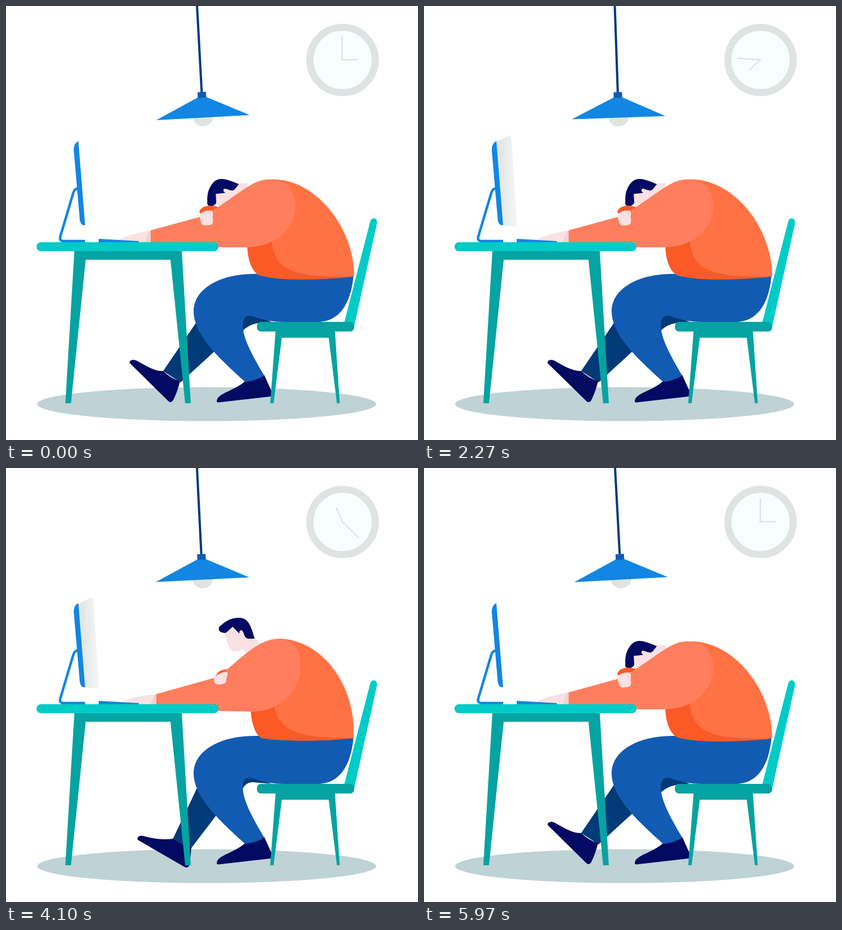
An HTML page that plays this animation: 729 px wide and 768 px high, repeating every 6010 ms.

```html
<!DOCTYPE html>
<html lang="en">
<head>
<meta charset="utf-8">
<title>Sleepy desk</title>
<style>
  html, body { margin: 0; width: 100%; height: 100%; overflow: hidden; background: #fff; }
  svg { display: block; width: 100%; height: 100%; }
</style>
</head>
<body>
<svg viewBox="0 0 729 768">
  <defs>
    <linearGradient id="glow" gradientUnits="userSpaceOnUse" x1="128" y1="0" x2="165" y2="0">
      <stop offset="0" stop-color="#dde3e1"/><stop offset="1" stop-color="#f5f7f7"/>
    </linearGradient>
  </defs>

  <ellipse cx="355" cy="704.5" rx="300" ry="30" fill="#bfd2d6"/>

  <g id="clock">
    <circle cx="595.5" cy="95.5" r="57.8" fill="#f8fdfe" stroke="#dfe4e2" stroke-width="12.6"/>
    <g stroke="#dfe4e2" stroke-width="2.4">
      <path id="hour" d="M595 96.2V68"/>
      <path id="minute" d="M595 96.2V54"/>
    </g>
  </g>

  <g id="lamp">
    <path d="M336.8 -30V154" stroke="#003a77" stroke-width="4"/>
    <ellipse cx="336.8" cy="197" rx="18" ry="16" fill="#dfe4e2"/>
    <path d="M253.9 197.8L330 161.5H343.6L419.5 197.8Z" fill="#1286e2"/>
    <path d="M329.3 152.5h15v10h-15z" fill="#125bb3"/>
  </g>

  <path d="M644.5 381C647 373 657 374 656.5 384L615 572L598 562Z" fill="#00cbc6"/>

  <path id="thigh" fill="#003a77"/>
  <path id="calf" fill="#003a77"/>
  <path id="farShoe" fill="#020a61"/>

  <path d="M423 664L457 653L470 682Q472 689 468 691L376 701.5Q371 702 374 695C380 684 405 680 423 664Z" fill="#020a61"/>
  <path d="M447 474C380 472 332 500 332 540C332 585 385 630 423 665Q441 664 457 654C440 625 419 590 419 565C419 551 425 546 436 549C455 556 475 559 490 559H555C600 556 612 510 615 476Z" fill="#125bb3"/>

  <path id="torso" fill="#ff7243"/>
  <path id="belly" fill="#fb5a27"/>

  <g id="head">
    <path d="M401 280L387 290C390 305 393 325 408 325C414 325 416 319 420 322L428 329L452 313L440 300L421 288Z" fill="#fae1e3"/>
    <path d="M383 291C376 291 374 281 381 278C392 268 402 265 412 265C430 265 434 282 440 302L428 302C421 300 422 294 419 289C417 285 412 287 413 293L401 281L390 291Q387 293 383 291Z" fill="#020a61"/>
  </g>

  <path id="farCuff" fill="#fb5a27"/>
  <path id="hand" fill="#fae1e3"/>
  <path id="wrist" fill="#efd2d5"/>
  <path id="arm" fill="#ff7e5d"/>
  <path id="fist" fill="#fae1e3"/>
  <path id="thumb" fill="none" stroke="#f3c9c6" stroke-width="1"/>

  <g id="chair" fill="#05a3a2">
    <rect x="444" y="559" width="172" height="17" rx="7"/>
    <path d="M477 575H582L590.5 703H585.5L571 587H488L473.5 703H467.5Z"/>
  </g>

  <g id="computer">
    <path id="screen" fill="url(#glow)"/>
    <path d="M128 239L140 388Q132 389 130.500 378L120 256Q119 244 128 239Z" fill="#1286e2"/>
    <path d="M128 323Q121 323 119 331L96 408Q94 416 102 416H140" fill="none" stroke="#1286e2" stroke-width="4.500"/>
    <path d="M164 412L235 416V419H164Z" fill="#1286e2"/>
  </g>

  <g id="table">
    <path d="M121 433H311L327 703H317L291 449H141L115 703H105Z" fill="#05a3a2"/>
    <rect x="54" y="418" width="322" height="16" rx="8" fill="#00cbc6"/>
  </g>
</svg>
<script>
const LOOP = 6010, LAST = 179, STEP = 5970 / LAST;
const $ = id => document.getElementById(id);

// Each outline as [asleep, awake]
const poses = {
  thigh: [
    'M418 576C416 550 426 543 440 547L470 559L446 561Q428 564 418 576Z',
    'M418 569C416 550 426 543 440 547L470 559L437 556Q424 556 418 569Z'],
  calf: [
    'M338 558L278 646L309 666L368 612L375 580Z',
    'M340 562L295 657L326 675L371 616L375 580Z'],
  farShoe: [
    'M219 632C217 627 225 624 232 628C250 638 262 646 278 646Q292 659 308 664C305 676 300 690 295 699Q291 703 287 699Z',
    'M233 658C231 652 238 649 246 652C265 657 280 658 296 656Q310 667 328 671C327 683 326 694 324 704Q321 709 316 706Z'],
  torso: [
    'M428 420L468 307C545 303 616 390 616 478C560 485 480 487 447 476Q427 460 427 424Z',
    'M434 420L482 302C560 303 620 385 615 478C560 484 490 484 452 478Q433 460 433 426Z'],
  belly: [
    'M427 420C428 448 433 467 447 476C480 487 560 485 615 479C510 480 472 470 470 410Z',
    'M433 420C434 448 438 469 452 478C490 484 560 484 615 478C515 478 477 466 474 410Z'],
  farCuff: [
    'M342 364C346 352 364 351 376 356L366 372L346 372Z',
    'M369 373C373 359 384 355 394 357L390 372L372 375Z'],
  hand: [
    'M200 413Q220 404 245 399L257 397V419L205 417Z',
    'M208 413Q228 404 252 402L267 400V419L213 417Z'],
  wrist: [
    'M253 398L257 397V419H245Z',
    'M263 401L267 400V419H255Z'],
  arm: [
    'M256 397L340 374C375 362 420 320 445 311Q458 306 470 307C500 309 512 330 512 355C512 395 475 427 425 427L380 427L256 418Z',
    'M266 400L370 371C385 366 420 327 450 311Q466 302 484 302C510 304 522 325 522 350C521 395 485 431 435 431L380 430L266 418Z'],
  fist: [
    'M343 375C342 364 350 364 356 362L364 362C368 366 365 370 366 375C367 384 366 388 357 388C347 390 346 386 343 375Z',
    'M368 375C368 367 377 365 382 362L391 361C394 365 390 369 390 374C390 381 385 383 377 383C370 383 368 380 368 375Z'],
  thumb: [
    'M361 366Q362 372 365 376',
    'M386 367Q387 371 390 373']
};

const lerp = (a, b, k) => a + (b - a) * k;
const ease = (t, from, to) => {
  const k = Math.min(1, Math.max(0, (t - from) / (to - from)));
  return (1 - Math.cos(Math.PI * k)) / 2;
};
// Sum of eased rises and falls, each pulse given as [rise start, rise end, fall start, fall end]
const pulses = (t, list) =>
  list.reduce((sum, [a, b, c, d]) => sum + ease(t, a, b) - ease(t, c, d), 0);

const NUMBER = /-?\d+(\.\d+)?/g;
function morph([from, to], k) {
  const ends = to.match(NUMBER);
  let i = 0;
  return from.replace(NUMBER, n => lerp(+n, +ends[i++], k).toFixed(2));
}
const rotate = (id, angle, x, y) =>
  $(id).setAttribute('transform', `rotate(${angle.toFixed(3)} ${x} ${y})`);

function draw(time) {
  const frame = Math.min(LAST, Math.floor((time % LOOP + 5) / STEP));
  const t = frame * STEP, p = frame / LAST;

  rotate('minute', 720 * p, 595, 95);
  rotate('hour', 90 + 360 * p, 595, 95);
  rotate('lamp', -3.1 * Math.cos(6 * Math.PI * p), 336.8, -23);

  const awake = pulses(t, [[0, 600, 1160, 1660], [2930, 3530, 4190, 4690]]);
  for (const id in poses) $(id).setAttribute('d', morph(poses[id], awake));
  rotate('head', -51 * (1 - awake), 440, 338);

  const tap = 5 * Math.sin(13 * Math.PI * p) ** 2 * (1 - awake) ** 4;
  rotate('farShoe', -tap, lerp(285, 305, awake), lerp(652, 662, awake));

  const open = pulses(t, [[60, 600, 720, 1300], [1560, 2200, 2300, 2880], [2900, 3900, 5180, 5690]]);
  $('screen').setAttribute('d',
    `M128 240L${128 + 26 * open} ${240 - 12 * open}L${140 + 25 * open} ${388 + 3 * open}L140 388Z`);
}

const start = performance.now();
function tick() {
  draw(performance.now() - start);
  requestAnimationFrame(tick);
}
tick();
</script>
</body>
</html>
```
